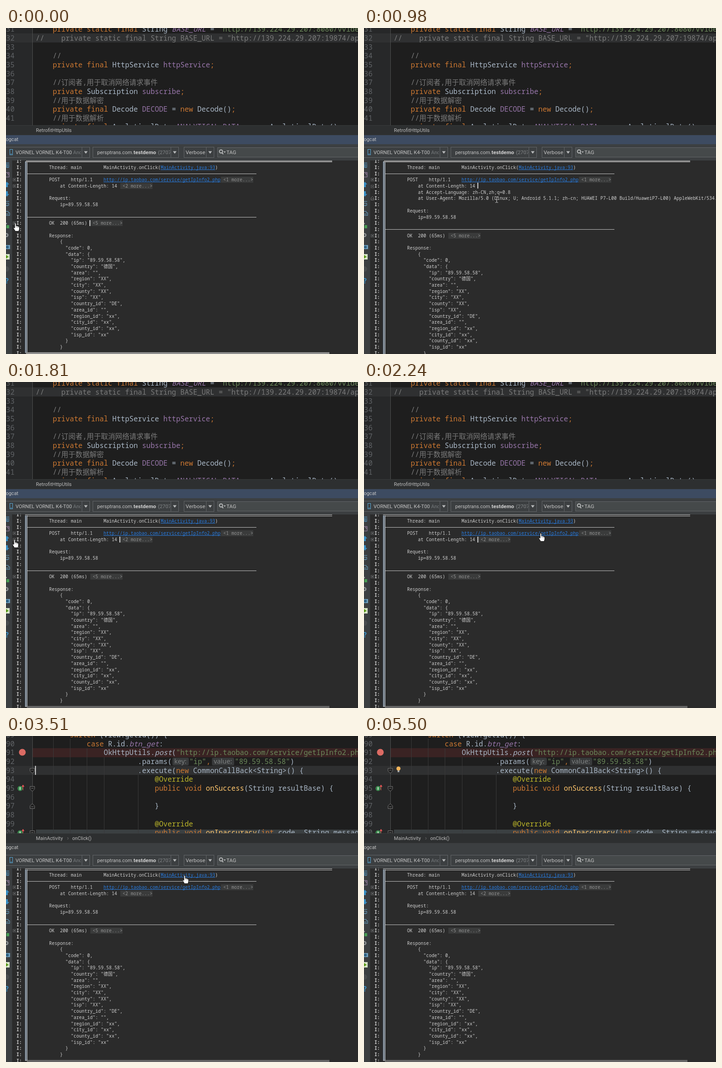
These frames come from a looping animation (776x721 px, 5650 ms). An HTML page with a canvas:

```html
<!DOCTYPE html>
<html>
<head>
<meta charset="utf-8">
<style>
html, body { margin: 0; width: 100%; height: 100%; overflow: hidden; background: #2b2b2b; }
canvas { display: block; }
</style>
</head>
<body>
<canvas id="stage" width="776" height="721"></canvas>
<script>
const c = document.getElementById('stage').getContext('2d');
const LOOP = 5650, W = 776, H = 721;
const MONO = '"Noto Sans Mono","Noto Sans CJK SC","Noto Sans CJK","DejaVu Sans Mono",monospace';
const LOG = '500 10px ' + MONO, CODE = '15.63px ' + MONO;
const UI = 'Roboto,"Open Sans",sans-serif';
const CH = 9.375, ROW = 13.69, LINE = 19.65;
const INK = { k: '#cc7832', w: '#a9b7c6', p: '#9876aa', P: '#9876aa', i: '#a9b7c6',
              s: '#6a8759', c: '#7a7a7a', m: '#ffc66d', a: '#bbb529' };
const LOG_INK = '#cfcfcf', CARET = '#d0d0d0';

function box(x, y, w, h, color) { c.fillStyle = color; c.fillRect(x, y, w, h); }
function frame(x, y, w, h, color) { c.strokeStyle = color; c.lineWidth = 1; c.strokeRect(x + .5, y + .5, w, h); }
function text(s, x, y, color, font) { c.font = font; c.fillStyle = color; c.fillText(s, x, y); }
function shape(d, fill, stroke, x = 0, y = 0) {
  const p = new Path2D(d);
  c.save();
  c.translate(x, y);
  c.lineWidth = 1;
  if (fill) { c.fillStyle = fill; c.fill(p); }
  if (stroke) { c.strokeStyle = stroke; c.stroke(p); }
  c.restore();
}
function dot(x, y, r, color) { c.fillStyle = color; c.beginPath(); c.arc(x, y, r, 0, 7); c.fill(); }
function clip(x, y, w, h, draw) {
  c.save(); c.beginPath(); c.rect(x, y, w, h); c.clip(); draw(); c.restore();
}

// One line of code: alternating colour keys and pieces of text.
function code(y, col, ...parts) {
  let x = 65.5 + col * CH;
  for (let i = 0; i < parts.length; i += 2) {
    const key = parts[i], slant = key === 'P' || key === 'i' ? 'italic ' : '';
    text(parts[i + 1], x, y, INK[key], slant + CODE);
    x += c.measureText(parts[i + 1]).width;
  }
}
function numbers(from, to, base) {
  for (let n = from; n <= to; n++)
    text(n, n > 99 ? -CH : 0, base(n), '#606366', CODE);
}
function editorBase() {
  box(0, 0, W, 215, '#1e1e1e');
  box(0, 0, 58, 215, '#272829');
}

function utilsEditor() {
  const y = n => Math.round(47.6 + LINE * (n - 33));
  editorBase();
  box(0, 12, W, 20, '#2f3031');
  box(58, 0, 1, 215, '#505050');
  numbers(31, 41, y);
  code(y(31), 4, 'k', 'private static final ', 'w', 'String ', 'P', 'BASE_URL', 'w', ' = ', 's', '"http://139.224.29.207:8080/vvideo');
  code(y(32), 0, 'c', '//    private static final String BASE_URL = "http://139.224.29.207:19874/app');
  code(y(34), 4, 'c', '//');
  code(y(35), 4, 'k', 'private final ', 'w', 'HttpService ', 'p', 'httpService', 'k', ';');
  code(y(37), 4, 'c', '//订阅者,用于取消网络请求事件');
  code(y(38), 4, 'k', 'private ', 'w', 'Subscription ', 'p', 'subscribe', 'k', ';');
  code(y(39), 4, 'c', '//用于数据解密');
  code(y(40), 4, 'k', 'private final ', 'w', 'Decode ', 'p', 'DECODE', 'w', ' = ', 'k', 'new ', 'w', 'Decode()', 'k', ';');
  code(y(41), 4, 'c', '//用于数据解析');
  code(y(42), 4, 'k', 'private final ', 'w', 'AnalyticalData ', 'p', 'ANALYTICAL_DATA', 'w', ' = ', 'k', 'new ', 'w', 'AnalyticalData()', 'k', ';');
}

function hint(s, x, w) {
  c.fillStyle = '#383a3b';
  c.beginPath(); c.roundRect(x, 48, w, 17, 3); c.fill();
  text(s, x + 4, 61, '#7d8080', '14.5px "Noto Sans","Open Sans",sans-serif');
}
function override(y) {
  dot(31, y, 5.5, '#3f8f52');
  box(30, y - 3, 2, 6, '#d5e5d5');
  shape('M0 5V-5M-2.5 -3L0 -7L2.5 -3Z', '#e05555', '#e05555', 37.5, y - 1);
}
function fold(y, up) {
  shape(up ? 'M-5 5V-1L0 -6L5 -1V5ZM-2.5 1H2.5' : 'M-5 -5H5V1L0 6L-5 1ZM-2.5 -1H2.5', '#1e1e1e', '#7a7a7a', 58, y + .5);
}
function activityEditor(t) {
  const y = n => Math.round(81.6 + LINE * (n - 93));
  editorBase();
  box(58, 27, W, 20, '#3a2323');
  box(0, 66, W, 20, '#2f3031');
  box(66, 207, W, 8, '#3b4042');
  box(58, 0, 1, 215, '#505050');
  [[104, 0], [141, 6], [178, 27], [216, 47], [291, 86]].forEach(([x, top]) => box(x, top, 1, 215 - top, '#393939'));
  numbers(89, 100, y);
  code(y(89), 8, 'k', 'switch ', 'w', '(view.getId()) {');
  code(y(90), 12, 'k', 'case ', 'w', 'R.id.', 'P', 'btn_get', 'w', ':');
  code(y(91), 16, 'w', 'OkHttpUtils.', 'i', 'post', 'w', '(', 's', '"http://ip.taobao.com/service/getIpInfo2.php"');
  code(y(92), 24, 'w', '.params(');
  hint('key:', 367, 36);
  code(y(92), 36.1, 's', '"ip"', 'k', ',');
  hint('value:', 454, 49);
  code(y(92), 46.8, 's', '"89.59.58.58"', 'w', ')');
  code(y(93), 24, 'w', '.execute(', 'k', 'new ', 'w', 'CommonCallBack<String>() {');
  code(y(94), 28, 'a', '@Override');
  code(y(95), 28, 'k', 'public void ', 'm', 'onSuccess', 'w', '(String resultBase) {');
  code(y(97), 28, 'w', '}');
  code(y(99), 28, 'a', '@Override');
  code(y(100), 28, 'k', 'public void ', 'm', 'onInaccuracy', 'w', '(', 'k', 'int ', 'w', 'code', 'k', ', ', 'w', 'String message');
  dot(36, 36, 7.5, '#db6b64');
  override(116);
  override(214);
  fold(76); fold(116); fold(155, true); fold(214);
  if (t < 4490 || t >= 4940 && t < 5500) box(64, 66, 2, 20, CARET);
  if (t >= 4340) {
    dot(76, 72, 4.5, '#f2b55a');
    box(74, 76, 4, 4, '#a5a5a5');
  }
}

function arrow(x, y) { shape('M-4 -2.5H4L0 3Z', '#b8babb', null, x, y); }
function combo(x, w, split) {
  frame(x, 263, w, 23, '#636669');
  box(split, 264, 1, 22, '#636669');
  arrow((split + x + w) / 2 + .5, 275);
}
function panels(inActivity) {
  box(0, 215, W, 21, '#2d2f30');
  box(0, 215, W, 1, '#393b3c');
  if (inActivity) {
    text('MainActivity', 66, 230, '#bbbbbb', '10.8px ' + UI);
    shape('M0 -2.5L2 0L0 2.5', null, '#777', 135.5, 226.5);
    text('onClick()', 146, 230, '#bbbbbb', '10.7px ' + UI);
  } else text('RetrofitHttpUtils', 66, 230, '#bbbbbb', '11px ' + UI);

  box(0, 236, W, 21, inActivity ? '#3c3f41' : '#3d4b61');
  box(0, 236, W, 1, '#323334');
  text('Logcat', -6.5, 250, '#c4c4c4', '11px ' + UI);
  box(0, 257, W, 36, '#3c3f41');

  combo(-2, 186, 167);
  frame(8, 268, 6, 12, '#58a9d8');
  box(10, 278, 3, 1, '#58a9d8');
  text('VORNEL VORNEL K4-T00', 21, 279, '#c4c4c4', '11.1px ' + UI);
  clip(0, 260, 165, 30, () => text('Android', 148, 279, '#777b7d', '11px ' + UI));
  combo(191, 189, 363);
  text('persptrans.com.', 201, 279, '#c4c4c4', '11px ' + UI);
  text('testdemo', 281, 279, '#d0d0d0', 'bold 11.7px ' + UI);
  clip(190, 260, 172, 30, () => text('(27075)', 335, 279, '#85888a', '11.2px ' + UI));
  combo(392, 66, 441);
  text('Verbose', 396, 279, '#c4c4c4', '11.8px ' + UI);
  box(467, 265, W, 20, '#45494a');
  frame(466, 264, W, 21, '#636669');
  c.lineWidth = 2; c.strokeStyle = '#b8babb';
  c.beginPath(); c.arc(474, 273, 3.5, 0, 7); c.moveTo(476, 276); c.lineTo(479, 279); c.stroke();
  shape('M-2.5 -1H2.5L0 2Z', '#b8babb', null, 482, 274);
  text('TAG', 486, 279, '#c4c4c4', '11.4px ' + UI);
}

function sideBar() {
  const blue = '#3a8fc4', grey = '#8d9193';
  box(0, 292, 14, H, '#3c3f41');
  box(13, 292, 1, H, '#323435');
  shape('M0 298H7M1 300V308H6V300M3 300V307', null, '#58a2cf', 0, .5);
  shape('M0 319H7V329H0M2 321H5V325', null, '#a58aae', 0, .5);
  shape('M-3 346L2 340L7 346H4V352H0V346Z', blue);
  shape('M-3 367L2 373L7 367H4V361H0V367Z', blue);
  shape('M0 383H7M0 387H6V392H1M3 390L1 392L3 394', null, '#6ba6c9', 0, .5);
  shape('M0 405H5V408H8V414H0M0 411H6', null, '#6ba6c9', 0, .5);
  box(1, 436, 6, 7, '#499c54');
  box(0, 431, 2, 3, grey);
  dot(1, 458, 4.5, grey); dot(1, 458, 1.8, '#3c3f41');
  box(-2, 480, 11, 9, '#6e9dbb'); dot(3, 484.5, 3, '#2d5e7f');
  box(-2, 500, 10, 12, '#d8e5c8'); shape('M0 502L6 506L0 510Z', '#5c9a1c');
  dot(1, 533, 6, '#494c4e');
  text('?', -2, 565, blue, 'bold 16px ' + UI);
}

const HEAD = ['=', 'Thread: main        MainActivity.onClick(MainActivity.java:93)', '-',
  'POST    http/1.1    http://ip.taobao.com/service/getIpInfo2.php <1 more...>'];
const LENGTH = '    at Content-Length: 14';
const EXTRA = ['    at Accept-Language: zh-CN,zh;q=0.8',
  '    at User-Agent: Mozilla/5.0 (Linux; U; Android 5.1.1; zh-cn; HUAWEI P7-L00 Build/HuaweiP7-L00) AppleWebKit/534.30'];
const fields = Object.entries({ ip: '89.59.58.58', country: '德国', area: '', region: 'XX', city: 'XX', county: 'XX',
  isp: 'XX', country_id: 'DE', area_id: '', region_id: 'xx', city_id: 'xx', county_id: 'xx', isp_id: 'xx' });
const TAIL = ['', 'Request:', '    ip=89.59.58.58', '', '-', 'OK  200 (65ms)  <5 more...>', '', 'Response:',
  '    {', '      "code": 0,', '      "data": {',
  ...fields.map(([k, v], i) => `        "${k}": "${v}"${i < fields.length - 1 ? ',' : ''}`),
  '      }', '    }', '='];
const FOLDED = [...HEAD, LENGTH + '  <2 more...>', ...TAIL];
const OPEN = [...HEAD, LENGTH, ...EXTRA, ...TAIL];

function bars(y, h) {
  for (const x of [42, 45]) {
    box(x, y, 1, h, '#7f9bb8');
    box(x + 1, y, 1, h, '#c3c3c3');
  }
}
function logText(s, mid) {
  const y = mid + 4;
  let x = 95;
  for (const part of s.split(/(https?:\S+|MainActivity\.java:\d+|<\d more\.\.\.>)/)) {
    const w = part.length * 6;
    if (/^<\d/.test(part)) {
      box(x - 5, mid - 6, w + 5, 13, '#3a3b3b');
      text(part, x, y, '#929292', LOG);
    } else if (/^http:|java:/.test(part)) {
      text(part, x, y, '#287bde', LOG);
      box(x, y + 1, w, 1, '#287bde');
    } else text(part, x, y, LOG_INK, LOG);
    x += w;
  }
}
function prefix(mid) { text('I:', 23, mid + 4, LOG_INK, 'bold 10px ' + MONO); }
function foldMark(mid) {
  frame(15, mid - 3, 6, 6, '#5c5e5f');
  box(17, mid, 3, 1, '#85888a');
  box(18, mid - 1, 1, 3, '#85888a');
}
// The double rule blurs into one band while the log is scrolled by a pixel.
function doubleRule(y, w, blurred) {
  if (blurred) return box(44, y, w + 2, 4, '#8e8e8e');
  box(42, y, w + 4, 1, '#c3c3c3');
  box(46, y + 3, w, 1, '#c3c3c3');
}
function log(open, shift) {
  const rows = open ? OPEN : FOLDED;
  const bottom = Math.min(H, 294 + (rows.length - 1) * ROW);
  bars(295, bottom - 295);
  rows.forEach((s, i) => {
    const top = 293.3 + i * ROW, mid = Math.round(top + shift);
    prefix(mid);
    if (s === '-') box(46, mid, 506, 1, '#c3c3c3');
    else if (s === '=') doubleRule(Math.floor(top), i ? 667 : 673, shift);
    else logText(s, mid);
    if (/ more/.test(s)) foldMark(mid);
  });
  if (open) {
    frame(15, 347, 6, 6, '#5c5e5f');
    box(17, 350, 3, 1, '#85888a');
    shape('M15 380V375L18 372L21 375V380ZM17 377H20', null, '#777', .5, .5);
  }
}
function popup() {
  box(14, 356, W, 33, '#2b2b2b');
  frame(13, 356, W, 32, '#7c7e7f');
  bars(357, 31);
  EXTRA.forEach((s, i) => { prefix(365 + i * 14); logText(s, 365 + i * 14); });
}

// Pointer steps: time, x, y, shape (h = hand, i = text beam, empty = away)
const POINTER = [
  [0, 21, 431, 'h'], [270, 120, 405, 'i'], [400, 220, 370, 'i'], [520, 291, 348, 'i'], [830, 18, 349, 'h'],
  [980, 292, 379, 'i'], [1250, 160, 370, 'i'], [1370, 32, 364, 'i'], [1520, 23, 354, 'h'], [1670, 19, 348, 'h'],
  [1940, 28, 364, 'i'], [2090, 212, 387, 'i'], [2240, 390, 334, 'h'], [2360, 394, 303, 'h'], [2510, 394, 300, 'h'],
  [2650, 394, 305, 'h'], [2780, 394, 308, 'h'], [3920, 440, 335, 'i'], [4040, 500, 363, 'i'], [4190, 655, 513, 'i'],
  [4340, 707, 655, 'i'], [4490, 750, 712, 'i'], [4640, 0, 0, '']];
const HAND = 'M-1.8 1.5Q-.3 -.6 1.2 1.5V6.5Q3.2 5.6 4 7.2Q5.9 6.4 6.5 8.2Q8.5 7.8 8.5 9.8V13Q8.3 16 6.8 18.5H-.5Q-2 15.5 -4.6 12Q-4.6 9.6 -1.8 11.2Z';
function pointer(t) {
  const [, x, y, kind] = POINTER.filter(p => p[0] <= t).pop();
  if (kind === 'h') {
    shape(HAND, '#fff', '#111', x, y);
    shape('M1.2 7V10M4 8V11M6.5 9V11', null, '#888', x, y);
  } else if (kind === 'i')
    shape('M-3 -6.5H-1L0 -5.5L1 -6.5H3M0 -5.5V5.5M-3 6.5H-1L0 5.5L1 6.5H3', null, '#d8d8d8', x + .5, y + .5);
}
function logCaret(t) {
  if (t < 830) box(184, 425, 2, 13, CARET);
  else if (t >= 980 && t < 1670 || t >= 1810 && t < 2510 || t >= 3080 && t < 3360) box(250, 342, 2, 13, CARET);
}

function draw(t) {
  const inActivity = t >= 3510;
  clip(0, 0, W, 215, () => inActivity ? activityEditor(t) : utilsEditor());
  panels(inActivity);
  box(0, 293, W, H, '#2b2b2b');
  sideBar();
  clip(14, 292, W, H, () => {
    log(t >= 980 && t < 1810, t < 1810 ? 1 : 0);
    logCaret(t);
    if (t >= 520 && t < 830) popup();
  });
  pointer(t);
}
function tick() {
  draw(performance.now() % LOOP);
  requestAnimationFrame(tick);
}
tick();
</script>
</body>
</html>
```
